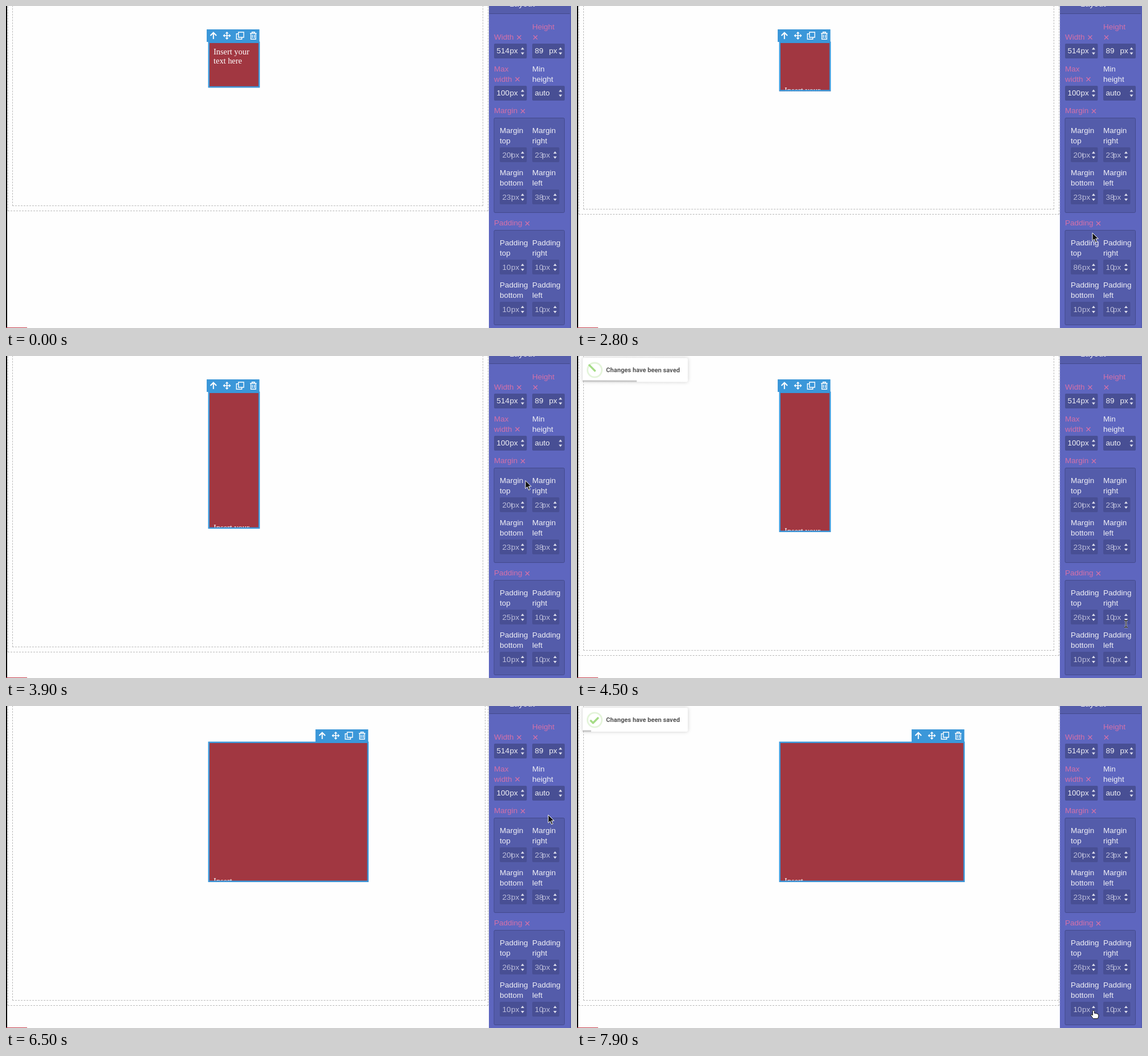
Animation, 991 px wide and 565 px high, one loop 8 s. Source, as an HTML page:

```html
<!DOCTYPE html>
<html lang="en">
<head>
<meta charset="utf-8">
<title>Layout editor</title>
<style>
  html, body { margin: 0; width: 100%; height: 100%; overflow: hidden; background: #fefefe; }
  #page { position: absolute; left: 0; top: 0; width: 846px; height: 565px; overflow: hidden; }
  #page div { position: absolute; box-sizing: border-box; border: 1px dashed rgba(170, 170, 170, .8); }
  #outer { left: 3px; top: -130px; width: 843px; }
  #inner { left: 11px; top: -121px; }
  svg { position: absolute; left: 0; top: 0; }
  #side text { font: 13.5px "Liberation Sans", Arial, sans-serif; }
  #words { font: 14.4px "Liberation Serif", Times, serif; fill: #fff; }
  #note text { font: bold 11.1px Roboto, sans-serif; fill: #545454; }
  #card { filter: drop-shadow(0 0 3px #ccc); }
</style>
</head>
<body>
<div id="page"><div id="outer"></div><div id="inner"></div></div>
<svg width="991" height="565" viewBox="0 0 991 565">
  <defs>
    <clipPath id="boxClip"><rect id="clipRect" x="355" y="63"/></clipPath>
    <clipPath id="leftClip"><rect x="866" width="22" height="565"/></clipPath>
    <clipPath id="rightClip"><rect x="923" width="20.5" height="565"/></clipPath>
  </defs>
  <path d="M0 0h2v565h-2z"/>
  <path d="M0 564h37v1H0z" fill="#c8404f"/>

  <rect id="box" x="355" y="63" fill="#a13741"/>
  <g clip-path="url(#boxClip)"><g id="words"><text id="line1" x="364"/><text id="line2" x="364"/></g></g>
  <rect id="frame" x="355.75" y="63.75" fill="none" stroke="#3b97d9" stroke-width="2.5"/>
  <g id="tools">
    <rect x="-92.5" y="41" width="92.5" height="22" fill="#3b97d9"/>
    <g fill="none" stroke="#fff" stroke-width="2">
      <path d="M-86 52l5.3-5.3 5.3 5.3M-80.7 47v11"/>
      <path stroke-width="1.6" d="M-62.5 52h11M-57 46.5v11"/>
      <path fill="#fff" stroke="none" d="M-57 45l3 3.2h-6zM-57 59l3-3.2h-6zM-64 52l3.2-3v6zM-50 52l-3.2-3v6z"/>
      <path stroke-width="1.4" d="M-36.8 46h9.3v9h-9.3zM-37 48.8h-3.3v9.5h9.4v-3"/>
      <path stroke-width="1.4" d="M-16.5 48h11.5M-13 47.5v-1.8h4.5v1.8M-15 48.5v9.7h8.6v-9.7M-12.4 50.5v5.6M-9 50.5v5.6"/>
    </g>
  </g>

  <g id="side"></g>

  <g id="note">
    <rect id="card" x="10" y="3" width="184.5" height="42" rx="3" fill="#fff"/>
    <rect id="bar" x="10" y="42.5" height="2.8" fill="#000" opacity=".22"/>
    <circle cx="31" cy="24.5" r="12.6" fill="none" stroke="#a5dc86" stroke-opacity=".3" stroke-width="2.8"/>
    <g fill="#a5dc86"><rect id="tip" height="3.5" rx="1.4"/><rect id="long" height="3.5" rx="1.4"/></g>
    <text x="51" y="28">Changes have been saved</text>
  </g>

  <g id="cursor" stroke-linejoin="round">
    <path id="arrow" d="M0 0v14.2l3.3-3 2.5 5.6 2.5-1.1-2.5-5.4h4.5z" fill="#111" stroke="#fff"/>
    <path id="resize" d="M0-7.5l4 4.3H1.3v6.4H4L0 7.5l-4-4.3h2.7v-6.4H-4z" fill="#000" stroke="#fff"/>
    <g id="beam" fill="none">
      <path d="M-3-6h2l1 1 1-1h2M0-5V5M-3 6h2l1-1 1 1h2" stroke="#fff" stroke-width="2.6"/>
      <path d="M-3-6h2l1 1 1-1h2M0-5V5M-3 6h2l1-1 1 1h2" stroke="#111" stroke-width="1.3"/>
    </g>
    <path id="hand" d="M-1.6 1Q0-1 1.6 1v4.2q1.6-.8 2.6.5 1.6-.6 2.4.7 2-.2 2.2 1.5v3L7.3 14.5H-.6L-4.7 8.8q0-1.9 1.8-1.2l1.3 1.2z" fill="#fff" stroke="#111"/>
  </g>
</svg>
<script>
const $ = id => document.getElementById(id);
const set = (id, attrs) => { for (const k in attrs) $(id).setAttribute(k, attrs[k]); };

// ---------- side panel ----------
const PINK = '#d571a8', WHITE = '#f0f0f5', DIM = '#bcbedb';
const text = (x, y, s, fill = WHITE, more = '') => `<text x="${x}" y="${y + 4}" fill="${fill}" ${more}>${s}</text>`;
const rect = (x, y, w, h, fill, more = '') => `<rect x="${x}" y="${y}" width="${w}" height="${h}" fill="${fill}" ${more}/>`;
const cross = (x, y) => `<path d="M${x - 3.5} ${y - 3.5}l7 7m0-7l-7 7" stroke="${PINK}" stroke-width="1.3"/>`;
const arrows = (x, y) => `<path d="M${x - 3} ${y - 2.5}l3-4 3 4zm0 5l3 4 3-4z" fill="#dfe0ee"/>`;
const field = (x, y, w, value, unit, unitX) =>
  rect(x, y - 13, w, 26, '#484f94', 'rx="2"') + text(x + 4.5, y, value) + text(unitX, y, unit) + arrows(x + w - 7.5, y);

function cell(name, side, right, y, value) {
  const x = right ? 923 : 866;
  return text(x, y, name) + text(x, y + 18, side) + rect(x, y + 29, 47.5, 26, '#484f94', 'rx="2"') +
    text(x + 4.5, y + 43, value, DIM, `id="${name + side}" clip-path="url(#${right ? 'right' : 'left'}Clip)"`) +
    text(right ? 940 : 886, y + 43, 'px', DIM) + arrows(x + 40, y + 42.5);
}

const group = (name, y, crossX, values) =>
  text(856, y, name, PINK) + cross(crossX, y + .5) +
  rect(856, y + 12.5, 123.5, 166, '#545caa', 'stroke="#434a8c" rx="2"') +
  ['top', 'right', 'bottom', 'left'].map((side, i) =>
    cell(name, side, i % 2, y + 35 + 74 * (i >> 1), values[i])).join('');

$('side').innerHTML =
  rect(847, 0, 144, 565, '#5e66bf') + rect(847, 0, 142, 13, '#555dab') + rect(847, 13, 142, 1, '#434a8c') +
  rect(989, 0, 2, 565, '#565eb0') +
  text(883, -3, 'Layout', WHITE, 'style="font-size:14.8px"') +
  text(856, 55, 'Width', PINK) + cross(900, 55) + text(923, 37, 'Height', PINK) + cross(928.5, 55) +
  field(856, 79, 57.5, '514', 'px', 883.5) + field(923, 79, 57, '89', 'px', 952.5) +
  text(856, 111, 'Max', PINK) + text(856, 129, 'width', PINK) + cross(897, 128.5) +
  text(923, 111, 'Min') + text(923, 129, 'height') +
  field(856, 153, 57.5, '100', 'px', 883.5) + field(923, 153, 57, 'auto', '', 0) +
  group('Margin', 184, 906.5, [200, 230, 231, 381]) + group('Padding', 381, 914.5, [10, 10, 10, 10]);

// ---------- motion ----------
// Each row is [time, values...]; numbers are blended, names hold until the next row.
function at(rows, t) {
  let i = 0;
  while (i < rows.length - 1 && rows[i + 1][0] <= t) i++;
  const a = rows[i], b = rows[i + 1] || a;
  const p = b === a ? 0 : Math.max(0, (t - a[0]) / (b[0] - a[0]));
  return a.slice(1).map((v, k) => typeof v === 'number' ? v + (b[k + 1] - v) * p : v);
}

const padTop = [[2500, 10], [2600, 24], [3000, 148], [3200, 156], [3300, 167], [3700, 250], [3800, 250], [4000, 263]];
const padRight = [[5500, 10], [5700, 22], [6100, 96], [6400, 255], [6500, 302], [6600, 335], [6700, 351]];
const pointer = [
  [800, 951, 480, 'beam'], [900, 913, 456, 'beam'], [1000, 913, 456, 'beam'],
  [1100, 912, 484, 'beam'], [1300, 906, 449, 'hand'], [1500, 906, 449, 'hand'],
  [1600, 909, 453, 'resize'], [1800, 909, 454, 'resize'], [1900, 909, 454, 'resize'],
  [2000, 908, 455, 'resize'], [2100, 908, 455, 'resize'], [2200, 906, 456, 'resize'], [2500, 906, 456, 'resize'],
  [2600, 905, 444, 'arrow'], [3000, 903, 352, 'arrow'], [3100, 903, 352, 'arrow'], [3300, 903, 337, 'arrow'],
  [3700, 908, 225, 'arrow'], [3800, 908, 225, 'arrow'], [4000, 914, 212, 'arrow'], [4400, 957, 440, 'arrow'],
  [4500, 963, 470, 'beam'], [4800, 964, 470, 'beam'], [5200, 965, 466, 'resize'], [5500, 965, 466, 'resize'],
  [5600, 965, 458, 'arrow'], [6100, 965, 381, 'arrow'], [6500, 951, 191, 'arrow'], [6700, 935, 142, 'arrow'],
  [6900, 935, 142, 'arrow'], [7600, 910, 490, 'arrow'], [7800, 905, 530, 'hand'], [7900, 906, 534, 'hand']
];

// Toast: sway is [offset, angle]; tick strokes are [x, y, width] in em.
const EM = 11.2;
const sway = [[0, -.625, 2], [.165, 0, -2], [.33, .3125, 2], [.5, 0, 0]];
const tip = [[.405, .125, .125, 0], [.48, -.15, .5, 1.5], [.525, -.25, .625, 1.625], [.63, .75, 1.0625, .5], [.75, .1875, 1.125, .75]];
const long = [[.49, 1.0625, 1.25, 0], [.63, .875, .9375, 1.125], [.75, .4375, .9375, 1.375]];

function stroke(id, rows, s, angle) {
  const [x, y, w] = at(rows, s).map(v => v * EM);
  const left = 19.8 + x, top = 13.3 + y;
  set(id, { x: left, y: top, width: w, transform: `rotate(${angle} ${left + w / 2} ${top + 1.75})` });
}

function drawToast(t) {
  const s = (t - (t < 6000 ? 4014 : 6980)) / 1000;
  const shown = s >= 0 && s < 1.1;
  $('note').style.display = shown ? '' : 'none';
  if (!shown) return;
  const out = Math.max(0, (s - 1) / .1);
  const [dy, turn] = at(sway, s);
  set('note', { opacity: 1 - out, transform: `translate(0 ${dy * EM}) rotate(${turn + out} 102 24)` });
  set('bar', { width: 184.5 * Math.max(0, 1 - s) });
  stroke('tip', tip, s, 45);
  stroke('long', long, s, -45);
}

function drawBox(t) {
  const top = at(padTop, t)[0], right = at(padRight, t)[0];
  const w = Math.max(100, right + 10) * .9, h = Math.max(89, top + 10) * .9;
  const edge = 355 + w, bottom = 63 + h;
  $('Paddingtop').textContent = Math.round(top);
  $('Paddingright').textContent = Math.round(right);
  set('box', { width: w, height: h });
  set('clipRect', { width: w, height: h });
  set('frame', { width: w - 1.75, height: h - 1.75 });
  set('tools', { transform: `translate(${edge - .5} 0)` });
  const narrow = right > 20, base = 63 + top * .9 + 12.5;
  $('line1').textContent = narrow ? 'Insert' : 'Insert your';
  $('line2').textContent = narrow ? 'your' : 'text here';
  set('line1', { y: base });
  set('line2', { y: base + 16 });
  $('outer').style.height = Math.round(bottom + 217) + 130 + 'px';
  $('inner').style.height = Math.round(bottom + 208) + 121 + 'px';
  $('inner').style.width = Math.round(Math.max(837, edge + 205)) - 11 + 'px';
}

function drawCursor(t) {
  const [x, y, kind] = at(pointer, t);
  $('cursor').style.display = t < 800 ? 'none' : '';
  set('cursor', { transform: `translate(${x} ${y})` });
  for (const k of ['arrow', 'resize', 'beam', 'hand']) $(k).style.display = k === kind ? '' : 'none';
}

function draw() {
  const t = Math.floor(performance.now() % 8000 / 100) * 100; // the screen refreshes ten times a second
  drawBox(t);
  drawToast(t);
  drawCursor(t);
  requestAnimationFrame(draw);
}
draw();
</script>
</body>
</html>
```
